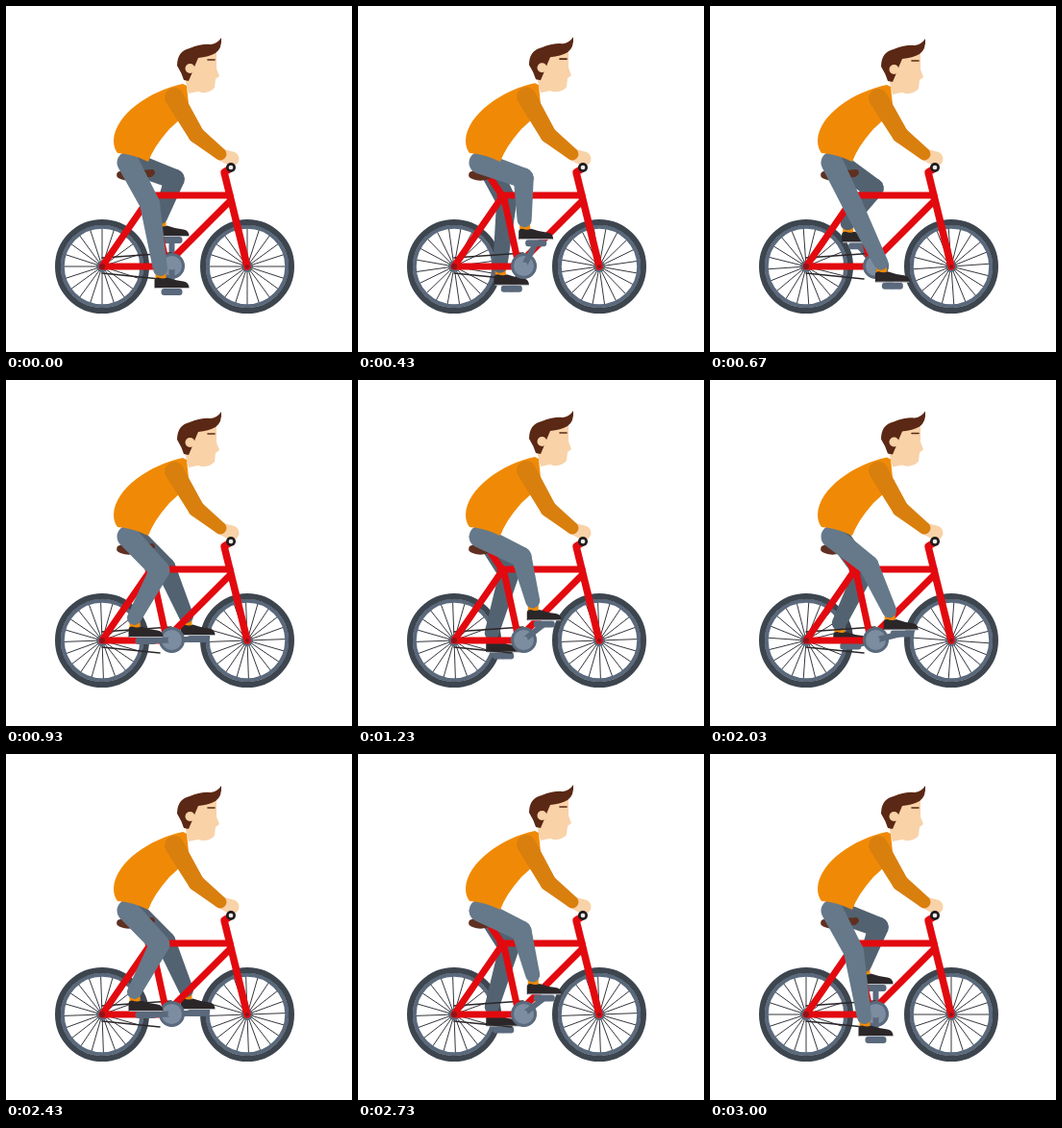
Animation of 360 by 360 pixels, one loop 3.03 s. Source, as an HTML page with a canvas:

```html
<!DOCTYPE html>
<html>
<head>
<meta charset="utf-8">
<title>Cyclist</title>
<style>
html, body { margin: 0; width: 100%; height: 100%; overflow: hidden; background: #fff; }
canvas { display: block; width: 360px; height: 360px; }
</style>
</head>
<body>
<canvas id="stage" width="360" height="360"></canvas>
<script>
const c = document.getElementById('stage').getContext('2d');
const TAU = Math.PI * 2;
const LOOP = 3030, STEPS = 90, FRAME = 100 / 3, TURN_STEPS = 22.5;
const CRANK = [172.5, 270.5], CRANK_LENGTH = 27;
const RED = '#e20a0f', STEEL = '#5a697c', SKIN = '#f9d2a8', ORANGE = '#f08a06',
      SLEEVE = '#d97f0e', HAIR = '#5a2814', DARK = '#2b2729';

function line(points, color, width, cap = 'round') {
  c.beginPath();
  points.forEach(p => c.lineTo(...p));
  c.strokeStyle = color;
  c.lineWidth = width;
  c.lineCap = cap;
  c.lineJoin = 'round';
  c.stroke();
}

function disc(x, y, r, color) {
  c.beginPath();
  c.arc(x, y, r, 0, TAU);
  c.fillStyle = color;
  c.fill();
}

function ring(x, y, r, color, width) {
  c.beginPath();
  c.arc(x, y, r, 0, TAU);
  c.strokeStyle = color;
  c.lineWidth = width;
  c.stroke();
}

function shape(d, color) {
  c.fillStyle = color;
  c.fill(new Path2D(d));
}

function box(x, y, w, h, r, color) {
  c.beginPath();
  c.roundRect(x, y, w, h, r);
  c.fillStyle = color;
  c.fill();
}

// Tapered capsule between two joints.
function limb([x1, y1], r1, [x2, y2], r2, color) {
  const dir = Math.atan2(y2 - y1, x2 - x1);
  const spread = Math.acos((r1 - r2) / Math.hypot(x2 - x1, y2 - y1));
  c.beginPath();
  c.arc(x1, y1, r1, dir + spread, dir - spread + TAU);
  c.arc(x2, y2, r2, dir - spread, dir + spread);
  c.fillStyle = color;
  c.fill();
}

function wheel(x, y, turn) {
  for (let i = 0; i < 20; i++) {
    const a = turn + i * TAU / 20;
    line([[x, y], [x + 40 * Math.cos(a), y + 40 * Math.sin(a)]], '#35363e', 1, 'butt');
  }
  ring(x, y, 41.2, STEEL, 4);
  ring(x, y, 46, '#3d454f', 6);
  disc(x, y, 6, STEEL);
}

const pedalAt = a => [
  CRANK[0] + CRANK_LENGTH * Math.cos(a),
  CRANK[1] + CRANK_LENGTH * Math.sin(a)
];

function pedal(a) {
  const [x, y] = pedalAt(a);
  line([CRANK, [x, y]], STEEL, 6);
  box(x - 11, y - 3.5, 22, 7, 3, STEEL);
}

function leg(hip, thigh, a, color) {
  const [px, py] = pedalAt(a);
  const ankle = [px - 12, py - 24];
  // The shin is foreshortened while the knee is raised.
  const shin = 55.5 + 13.5 * Math.sin(a);
  const dx = ankle[0] - hip[0], dy = ankle[1] - hip[1];
  const reach = Math.hypot(dx, dy);
  const bend = Math.acos(Math.min(1, (thigh ** 2 + reach ** 2 - shin ** 2) / (2 * thigh * reach)));
  const dir = Math.atan2(dy, dx) - bend;
  const knee = [hip[0] + thigh * Math.cos(dir), hip[1] + thigh * Math.sin(dir)];

  box(px - 17, py - 20, 11, 10, 1, ORANGE);
  c.save();
  c.translate(px, py);
  shape('M-18-4V-12Q-18-15-14-15Q-9-13-5-15Q3-12 12-11Q18-10 18-4Z', DARK);
  line([[-17, -4], [17, -4]], '#b9bcc2', 1);
  c.restore();
  limb(hip, 11.5, knee, 10.5, color);
  limb(knee, 10.5, ankle, 7.5, color);
}

function bike() {
  line([[100, 262], [172, 257]], DARK, 1.5);
  line([[100, 278], [160, 284]], DARK, 1.5);
  disc(...CRANK, 13, STEEL);
  line([[139, 181], [152, 200], [167, 269]], RED, 7);
  line([[167, 271], [100, 271], [149, 200]], RED, 7);
  line([[148, 197], [233, 197]], RED, 7);
  line([[172, 264], [233, 203]], RED, 7);
  line([[232, 170], [227, 173], [251, 271]], RED, 7.5);
  disc(100, 271, 3, '#8f1518');
  disc(251, 271, 2, '#8f1518');
  shape('M116 173Q124 168 140 171L153 170Q158 174 151 178L139 179Q128 184 119 180Q113 178 116 173Z', '#5f3021');
}

function upperBody(lift) {
  c.save();
  c.translate(0, lift);
  shape('M186 76L190 92L204 89L201 70Z', SKIN);
  shape('M192 53L219 48L219 66L222 74L218 77L217 86Q212 92 203 91Q194 89 191 76Z', SKIN);
  shape('M178 63Q178 48 191 45Q204 40 213 41Q220 40 224 34Q225 45 218 50Q211 54 200 55L197 62L193 72L190 79L185 78Q183 71 178 63Z', HAIR);
  disc(191.5, 66, 5, SKIN);
  line([[210, 57], [217, 57]], HAIR, 1.6);
  c.restore();

  shape(`M184 ${82 + lift}C150 ${89 + lift} 113 113 112 140Q112 148 116 153Q132 154 148 162Q154 146 170 128Q187 114 190 102L188 ${84 + lift}Z`, ORANGE);
  limb([222, 154], 6, [235, 159], 7.5, SKIN);
  limb([175, 96 + lift], 10, [198, 134], 8.5, SLEEVE);
  limb([198, 134], 8.5, [223, 154], 6.5, SLEEVE);
  disc(234, 168, 5, '#211e20');
  disc(234, 168, 2.3, '#f4eee8');
}

function draw(time) {
  const step = Math.min(STEPS, Math.floor((time % LOOP) / FRAME + 0.15));
  const turn = TAU * step / TURN_STEPS;
  const near = turn + TAU / 4, far = near + TAU / 2;

  c.fillStyle = '#fff';
  c.fillRect(0, 0, 360, 360);
  wheel(100, 271, turn);
  wheel(251, 271, turn);
  pedal(far);
  leg([135, 165], 43, far, '#536271');
  bike();
  disc(...CRANK, 13.5, STEEL);
  disc(...CRANK, 10.5, '#7d8da1');
  pedal(near);
  disc(...CRANK, 4, '#7d8da1');
  leg([127, 163], 48, near, '#65798a');
  upperBody(Math.sin(2 * near) - 1);
}

const start = performance.now();
function tick() {
  draw(performance.now() - start);
  requestAnimationFrame(tick);
}
tick();
</script>
</body>
</html>
```
